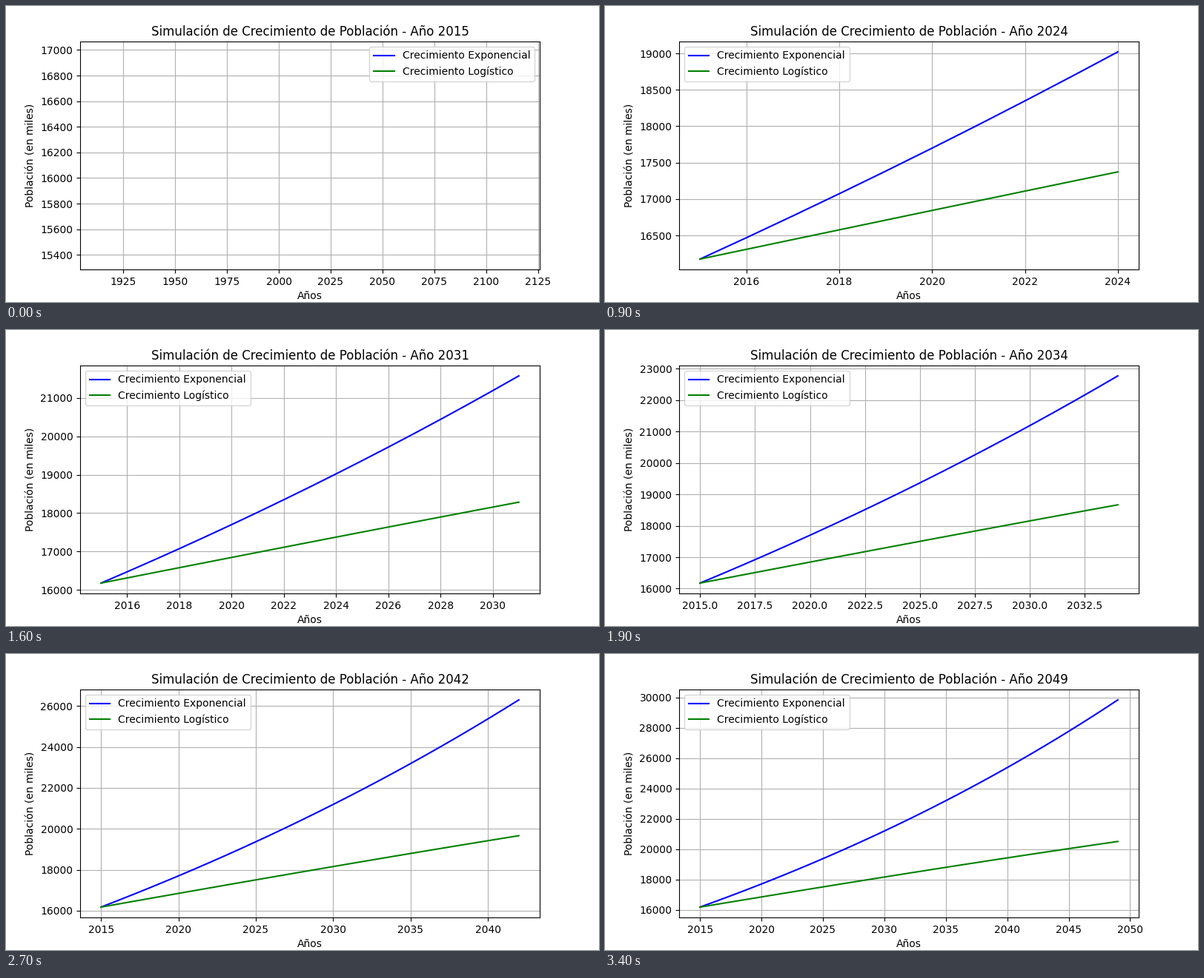
These frames come from a looping animation (800 px wide and 400 px high, 3500 ms). A matplotlib script:

```python
import matplotlib.pyplot as plt
import numpy as np
from matplotlib.animation import FuncAnimation

START = 16176.133    # initial population, thousands
RATE = 0.018         # yearly growth rate
CAPACITY = 30000     # carrying capacity, thousands
YEARS = np.arange(2015, 2050)


def exponential(t):
    return START * np.exp(RATE * t)


def logistic(t):
    ratio = (CAPACITY - START) / START
    return CAPACITY / (1 + ratio * np.exp(-RATE * t))


fig, ax = plt.subplots(figsize=(8, 4), dpi=100)


def update(i):
    years = YEARS[:i + 1]
    t = years - YEARS[0]
    ax.clear()
    ax.plot(years, exponential(t), color="blue", label="Crecimiento Exponencial")
    ax.plot(years, logistic(t), color="green", label="Crecimiento Logístico")
    ax.set_title(f"Simulación de Crecimiento de Población - Año {years[-1]}")
    ax.set_xlabel("Años")
    ax.set_ylabel("Población (en miles)")
    ax.legend()
    ax.grid(True)


anim = FuncAnimation(fig, update, frames=len(YEARS), interval=100, repeat=True,
                     repeat_delay=0)
plt.show()
```
